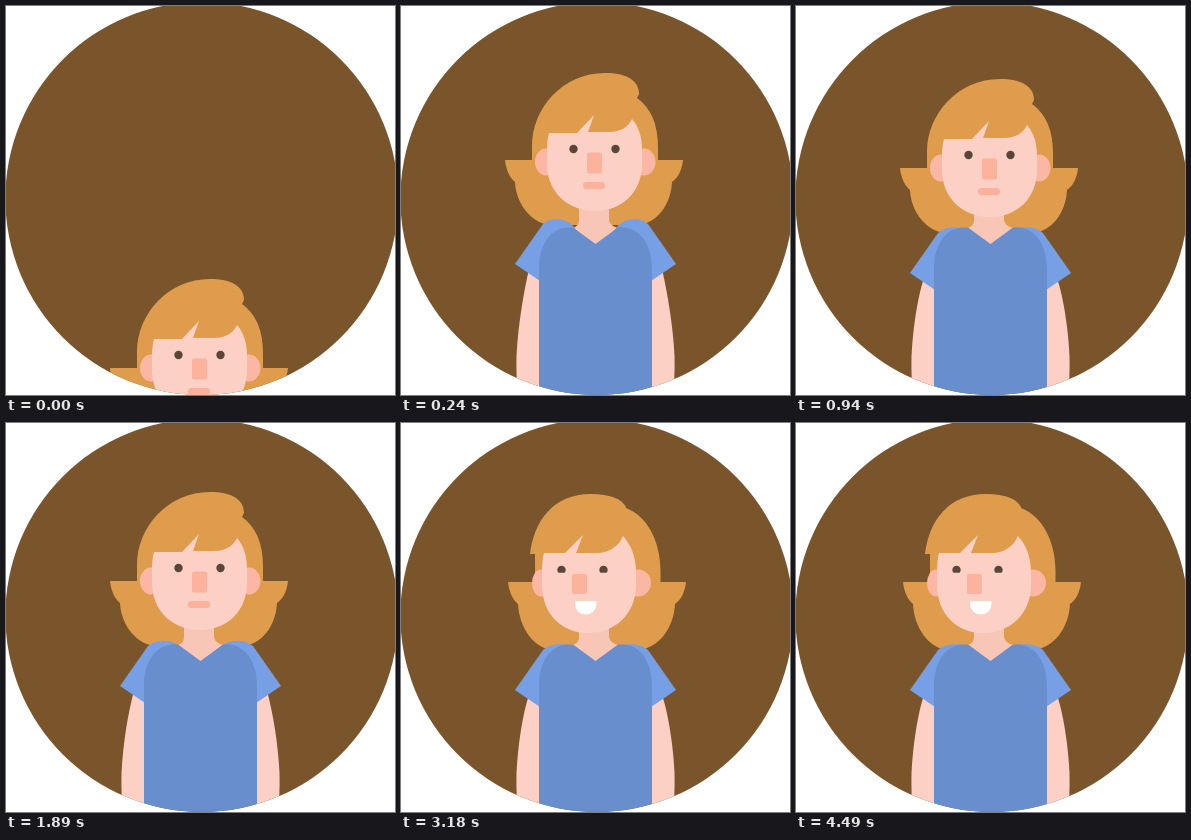
An HTML page with a canvas that plays this animation: 389x389 px, repeating every 4610 ms.

```html
<!DOCTYPE html>
<html lang="en">
<head>
<meta charset="utf-8">
<title>Hello</title>
<style>
  html, body { margin: 0; height: 100%; overflow: hidden; background: #fff; }
  canvas { display: block; }
</style>
</head>
<body>
<canvas id="stage" width="389" height="389"></canvas>
<script>
const ctx = document.getElementById('stage').getContext('2d');
const LOOP = 4610, STEP = 118;
const HAIR = '#df9c4d', SKIN = '#fdd0c5', EAR = '#fcb7a4', BLUSH = '#fcb29d';

// Vertical offsets per step while she pops up and settles
const HEAD = [200, 77, -6, -8, -4, -1];
const WINGS = [200, 75, -8, -10, -5, 1, 2, 1];
const BODY = [200, 69];
const SHRUG = [0, 0, 9, 8, 4, 1];

const at = (keys, k) => keys[k] ?? 0;
const clamp = x => Math.max(0, Math.min(1, x));
const smooth = x => (x = clamp(x), x * x * (3 - 2 * x));
const mix = (a, b, p) => a + (b - a) * p;

let turn = 0;

// "a>b" in a path is a number that goes from a to b as the head turns
function shape(color, path) {
  const d = path.replace(/([\d.]+)>([\d.]+)/g, (_, a, b) => mix(+a, +b, turn));
  ctx.fillStyle = color;
  ctx.fill(new Path2D(d));
}

function oval(color, x, y, rx, ry) {
  ctx.fillStyle = color;
  ctx.beginPath();
  ctx.ellipse(x, y, rx, ry, 0, 0, 7);
  ctx.fill();
}

function box(color, x, y, w, h, r) {
  ctx.fillStyle = color;
  ctx.beginPath();
  ctx.roundRect(x, y, w, h, r);
  ctx.fill();
}

function shifted(dy, draw) {
  ctx.save();
  ctx.translate(0, dy);
  draw();
  ctx.restore();
}

function drawWings() {
  shape(HAIR, `M104>107 162>159 H282>285 C281>284 172>169 277>280 180>177 271>274 184>181
    C270>273 206>204 256>258 227 234 227 H152>154 C131>133 227 115>118 206>204 114>117 184>181
    C109>112 180>177 105>108 172>169 104>107 162>159Z`);
}

function drawBody(shrug) {
  shape('#f8c6b7', 'M178 190 H208 V214 Q209 220 217 222 L194.5 240 L172 222 Q178 220 178 214Z');
  for (const flip of [1, -1]) {
    ctx.save();
    if (flip < 0) {
      ctx.translate(389, 0);
      ctx.scale(-1, 1);
    }
    shape(SKIN, `M128 ${272 - shrug} C122 290 117 320 115.5 350 Q115 372 117 389 H140 V260Z`);
    shape('#769fe5', `M176 225 C168 ${221 - shrug} 152 ${218.5 - shrug} 142 ${227 - shrug}
      L114 ${267 - shrug} L139 ${284 - shrug} H176Z`);
    ctx.restore();
  }
  shape('#688ecd', `M138 389 V263 C138 240 148 224 165 221.5 L172 221.5 L194.5 238 L217 221.5
    L224 221.5 C241 224 251 240 251 263 V389Z`);
}

function drawHead(blink, smile) {
  // Cap of hair with its tuft
  shape(HAIR, `M131>134 165>160 V146>131 L131>129 146>131 C131>133 108>98 162>152 73>71 204>190 73>71
    C225>209 73>71 238>221 80>76 238>225 94>84 L236>225 98>85
    C250>246 108>93 257>259.5 124>118 257>259.5 148 V165Z`);

  const dy = -2 * turn;
  oval(EAR, mix(145, 140, turn), 162 + dy, mix(11, 9, turn), 13.5);
  oval(EAR, mix(243, 237, turn), 162 + dy, mix(11.5, 13, turn), 13.5);

  // Face, its upper edge cut by the fringe
  shape(SKIN, `M148>143 133>130 H176>164 L193>182 115>112 L187>175 132>130 H208>196
    C220>208 132>130 228>218 126>123 231>222 119>113 C238>230 127>122 241>235 137>133 241>235 150
    V164>162 C241>235 193>192 220>213 211>210 194>187 211>210
    C168>162 211>210 146>141 193>192 146>141 164>162 V150 Q146>141 140>137 148>143 133>130Z`);

  for (const x of [172.5, 214.5]) {
    const ex = x + mix(0, -12, turn), ey = 149 + dy;
    oval('#594638', ex, ey, 4.2, mix(4.2, 0.8, blink));
    box(SKIN, ex - 6, ey + mix(5, 2.8, smile), 12, 5, 0);
  }

  box(BLUSH, mix(186, 171, turn), mix(152.5, 151, turn), 15, mix(21, 20, turn), 2);

  const rgb = [251, 177, 155].map(c => Math.round(mix(c, 255, smile)));
  const top = mix(3.2, 1, smile), low = mix(3.2, 10.5, smile);
  box(`rgb(${rgb})`, mix(182, 174, turn), mix(182, 178, smile),
    mix(22, 21.5, smile), mix(7, 13.5, smile), [top, top, low, low]);
}

function draw(time) {
  const k = Math.floor((time % LOOP + 10) / STEP) % 39;
  const breath = 4 * Math.sin(Math.PI * clamp((k - 14) / 4));
  const blink = clamp(1.5 - Math.abs(k - 10.5));
  const smile = smooth((k - 22) / 5);
  turn = smooth((k - 19) / 7);

  ctx.clearRect(0, 0, 389, 389);
  ctx.save();
  ctx.beginPath();
  ctx.arc(195.8, 192.5, 196.5, 0, 7);
  ctx.fillStyle = '#7a552c';
  ctx.fill();
  ctx.clip();
  shifted(at(WINGS, k) - breath, drawWings);
  shifted(at(BODY, k), () => drawBody(at(SHRUG, k) + breath));
  shifted(at(HEAD, k) - breath, () => drawHead(blink, smile));
  ctx.restore();
}

const start = performance.now();

function tick() {
  draw(performance.now() - start);
  requestAnimationFrame(tick);
}

tick();
</script>
</body>
</html>
```
